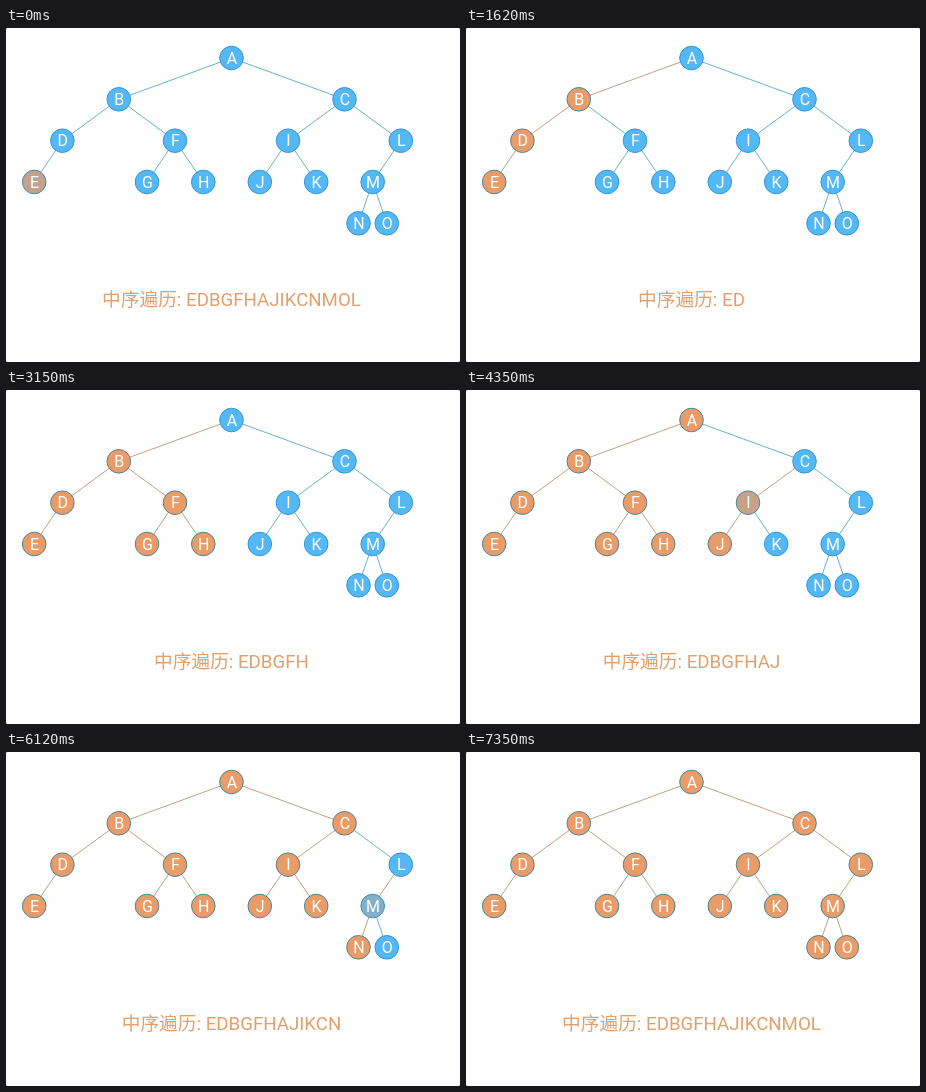
Animation of 454 by 334 pixels, one loop 7410 ms. Source, as an HTML page:

```html
<!DOCTYPE html>
<html lang="zh">
<head>
<meta charset="utf-8">
<style>
html, body { margin: 0; width: 100%; height: 100%; overflow: hidden; background: #888; }
svg { display: block; width: 454px; height: 334px; background: #fff; border-radius: 2px; }
text { font-family: Roboto, "Noto Sans CJK SC", "Noto Sans CJK", sans-serif; text-anchor: middle; }
.label { font-size: 16px; fill: #fff; }
.caption { font-size: 18.7px; fill: #e2a06c; }
</style>
</head>
<body>
<svg viewBox="0 0 454 334"></svg>
<script>
const LOOP = 7410;
const FIRST = 495, STEP = 464;           // node visits
const NODE_MS = 185, EDGE_MS = 164, TEXT_DELAY = 300;
const RESET_MS = 150;                    // tail of the previous run
const TITLE = '中序遍历: ';
const ORDER = 'EDBGFHAJIKCNMOL';

const FILL = [[85, 184, 246], [233, 156, 104]];
const RING = [[52, 150, 208], [74, 134, 150]];
const LINE = [[104, 178, 204], [194, 160, 128]];

// name: [x, y, parent]
const TREE = {
  A: [225.5, 30],
  B: [112.8, 71.3, 'A'], C: [338.5, 71.3, 'A'],
  D: [56.4, 112.7, 'B'], F: [169, 112.7, 'B'],
  I: [282, 112.7, 'C'], L: [394.8, 112.7, 'C'],
  E: [28.2, 154, 'D'], G: [141, 154, 'F'], H: [197.3, 154, 'F'],
  J: [253.8, 154, 'I'], K: [310.2, 154, 'I'], M: [366.7, 154, 'L'],
  N: [352.5, 195.3, 'M'], O: [380.8, 195.3, 'M']
};

const svg = document.querySelector('svg');

function add(tag, attrs, text = '') {
  const el = document.createElementNS('http://www.w3.org/2000/svg', tag);
  for (const key in attrs) el.setAttribute(key, attrs[key]);
  el.textContent = text;
  return svg.appendChild(el);
}

const clamp = v => Math.min(1, Math.max(0, v));
const mix = ([a, b], p) => `rgb(${a.map((v, i) => Math.round(v + (b[i] - v) * p))})`;

const edges = {}, discs = {};
for (const [name, [x, y, parent]] of Object.entries(TREE)) {
  if (!parent) continue;
  const [px, py] = TREE[parent];
  edges[name] = add('line', { x1: px, y1: py, x2: x, y2: y, 'stroke-width': 1 });
}
for (const [name, [x, y]] of Object.entries(TREE)) {
  discs[name] = add('circle', { cx: x, cy: y, r: 11.8, 'stroke-width': 1 });
  add('text', { class: 'label', x: x + 0.4, y: y + 5.7 }, name);
}
const caption = add('text', { class: 'caption', x: 225.5, y: 277.7 });

function draw(t) {
  let visited = 0;
  [...ORDER].forEach((name, k) => {
    const start = FIRST + k * STEP;
    const edgeStart = k ? start - EDGE_MS : start - 15;
    let p = clamp((t - start) / NODE_MS);
    if (!k && t < RESET_MS) p = 0.75 * (1 - t / RESET_MS);
    discs[name].setAttribute('fill', mix(FILL, p));
    discs[name].setAttribute('stroke', mix(RING, p));
    if (edges[name]) edges[name].setAttribute('stroke', mix(LINE, clamp((t - edgeStart) / EDGE_MS)));
    if (t >= start + TEXT_DELAY) visited = k + 1;
  });
  const text = TITLE + (t < RESET_MS ? ORDER : ORDER.slice(0, visited));
  if (caption.textContent !== text) caption.textContent = text;
}

const begin = performance.now();
function tick() {
  draw((performance.now() - begin) % LOOP);
  requestAnimationFrame(tick);
}
tick();
</script>
</body>
</html>
```
